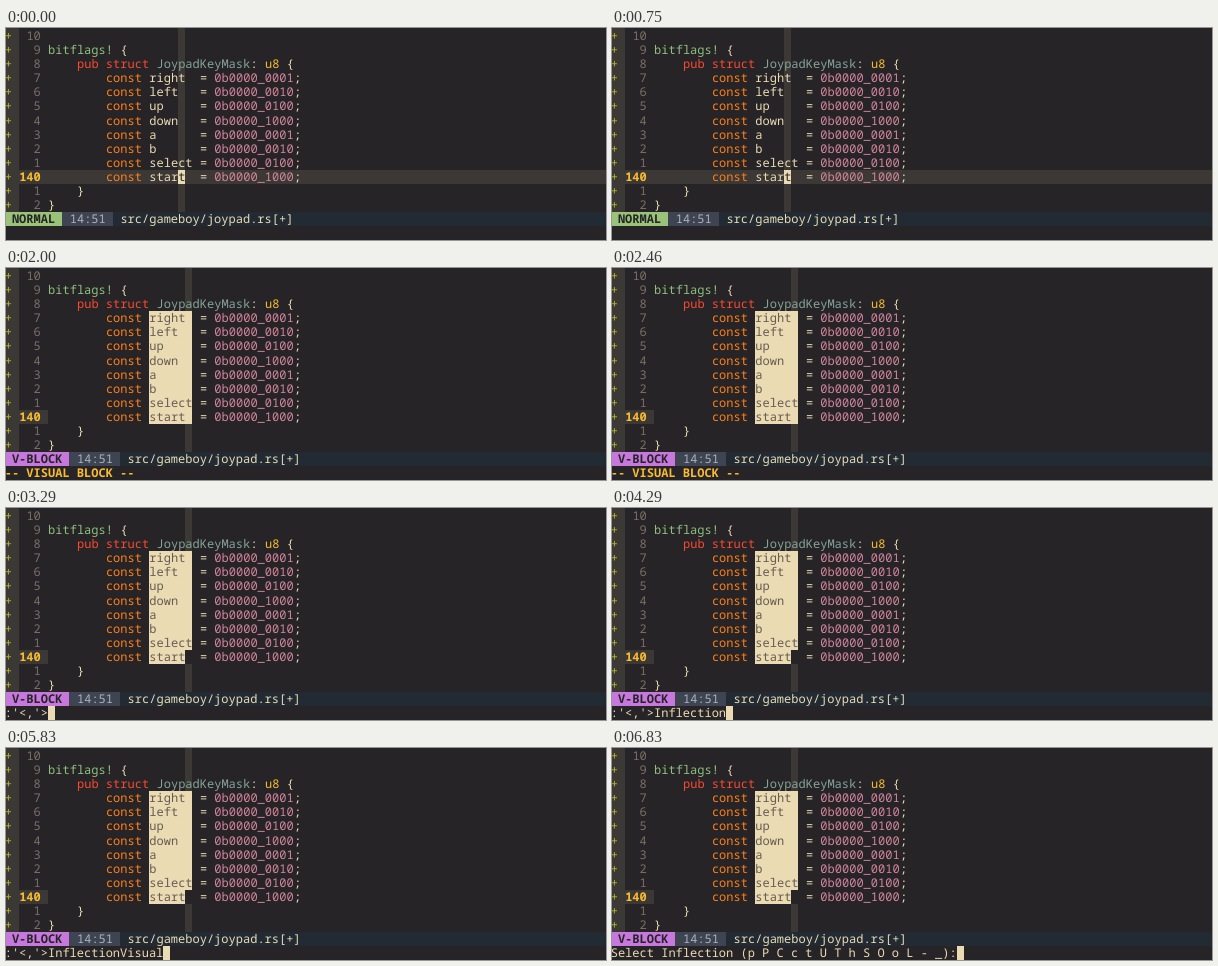
Animation, 600 px wide and 212 px high, one loop 6870 ms. Source, as an HTML page:

```html
<!DOCTYPE html>
<html lang="en">
<head>
<meta charset="utf-8">
<title>Editor block selection</title>
<style>
  html, body { margin: 0; width: 100%; height: 100%; overflow: hidden; background: #262427; }
  svg { display: block; }
  text {
    font: 500 12.03px "Noto Sans Mono", "DejaVu Sans Mono", monospace;
    white-space: pre;
    text-rendering: geometricPrecision;
  }
  .bold { font-weight: 700; }
</style>
</head>
<body>
<svg id="screen" width="600" height="212" viewBox="0 0 600 212"></svg>
<script>
const LOOP = 6870;
const T = { block: 1850, command: 3080, name: 3400, suffix: 4500, prompt: 6120 };
const C = {
  fg: '#ebdbb2', bg: '#262427', line: '#3c3836', dim: '#7c6f64', picked: '#665c54',
  red: '#fb4934', orange: '#fe8019', yellow: '#fabd2f', green: '#b8bb26',
  aqua: '#8ec07c', blue: '#83a598', purple: '#d3869b',
  bar: '#222b33', time: '#3e4452', timeText: '#abb2bf', normal: '#98c379', visual: '#c678dd'
};
const fields = ['right', 'left', 'up', 'down', 'a', 'b', 'select', 'start'];
const CODE = 6, CURRENT = 10, STATUS = 13, MESSAGE = 14;
const screen = document.getElementById('screen');

const x = col => col * 7.23 - 1.3;
const y = row => 0.6 + row * 14.1;
const edge = col => Math.max(0, Math.floor(x(col)));
const escape = s => s.replace(/&/g, '&amp;').replace(/</g, '&lt;').replace(/>/g, '&gt;');

const rect = (left, top, right, bottom, color) =>
  `<rect x="${left}" y="${top}" width="${right - left}" height="${bottom - top}" fill="${color}"/>`;

// Fills whole character cells.
const fill = (col, row, cols, color, rows = 1) =>
  rect(edge(col), Math.round(y(row)), edge(col + cols), Math.round(y(row + rows)), color);

const text = (col, row, s, color, bold) =>
  `<text x="${x(col).toFixed(2)}" y="${(y(row) + 11.3).toFixed(2)}" fill="${color}"` +
  `${bold ? ' class="bold"' : ''}>${escape(s)}</text>`;

function gutter() {
  let out = '';
  for (let row = 0; row < STATUS; row++) {
    const current = row === CURRENT;
    const number = current ? '140' : String(Math.abs(CURRENT - row));
    out += text(0, row, '+', C.green) +
      text(5 - number.length, row, number, current ? C.yellow : C.dim, current);
  }
  return out;
}

function code(block) {
  let out = text(CODE, 1, 'bitflags!', C.aqua) + text(CODE + 10, 1, '{', C.fg) +
    text(CODE + 4, 2, 'pub struct', C.red) +
    text(CODE + 15, 2, 'JoypadKeyMask', C.blue) + text(CODE + 28, 2, ':', C.fg) +
    text(CODE + 30, 2, 'u8', C.yellow) + text(CODE + 33, 2, '{', C.fg) +
    text(CODE + 4, 11, '}', C.fg) + text(CODE, 12, '}', C.fg);
  fields.forEach((name, i) => {
    const row = i + 3;
    const bits = (1 << i % 4).toString(2).padStart(4, '0');
    out += text(CODE + 8, row, 'const', C.orange) +
      text(CODE + 14, row, name, block ? C.picked : C.fg) +
      text(CODE + 21, row, '=', C.fg) +
      text(CODE + 23, row, '0b0000_' + bits, C.purple) +
      text(CODE + 34, row, ';', C.fg);
  });
  return out;
}

function status(block) {
  const mode = block ? ' V-BLOCK ' : ' NORMAL ';
  const end = mode.length;
  return rect(0, 184, 600, 198, C.bar) +
    fill(0, STATUS, end, block ? C.visual : C.normal) +
    fill(end, STATUS, 7, C.time) +
    text(0, STATUS, mode, C.bg, true) +
    text(end, STATUS, ' 14:51 ', C.timeText) +
    text(end + 8, STATUS, 'src/gameboy/joypad.rs[+]', C.fg);
}

function draw(block, input) {
  const cursor = CODE + (block ? 19 : 18);
  let out = rect(0, 0, 600, 212, C.bg) +
    rect(0, 0, edge(2), 184, C.line) +
    rect(edge(cursor), 0, edge(cursor + 1), 184, C.line) +
    rect(edge(2), 142, block ? edge(CODE) : 600, 156, C.line);
  if (block) out += fill(CODE + 14, 3, 6, C.fg, 8);
  // The cell under the cursor goes dark while the cursor is in the command line.
  out += fill(cursor, CURRENT, 1, input ? C.bg : C.fg);
  out += gutter() + code(block) + status(block);
  if (!block) out += text(cursor, CURRENT, 't', C.bg);
  else if (input) out += text(0, MESSAGE, input, C.fg) + fill(input.length, MESSAGE, 1, C.fg);
  else out += text(0, MESSAGE, '-- VISUAL BLOCK --', C.yellow, true);
  screen.innerHTML = out;
}

const typed = (s, t, start, step) => s.slice(0, Math.max(0, Math.floor((t - start) / step)));

function inputAt(t) {
  if (t < T.command) return '';
  if (t >= T.prompt) return 'Select Inflection (p P C c t U T h S O o L - _):';
  return ":'<,'>" + typed('Inflection', t, T.name, 75) + typed('Visual', t, T.suffix, 110);
}

let shown;
function tick(now) {
  const t = now % LOOP;
  const block = t >= T.block;
  const input = inputAt(t);
  const key = block + input;
  if (key !== shown) draw(block, input);
  shown = key;
  requestAnimationFrame(() => tick(performance.now() - start));
}
const start = performance.now();
tick(0);
</script>
</body>
</html>
```
